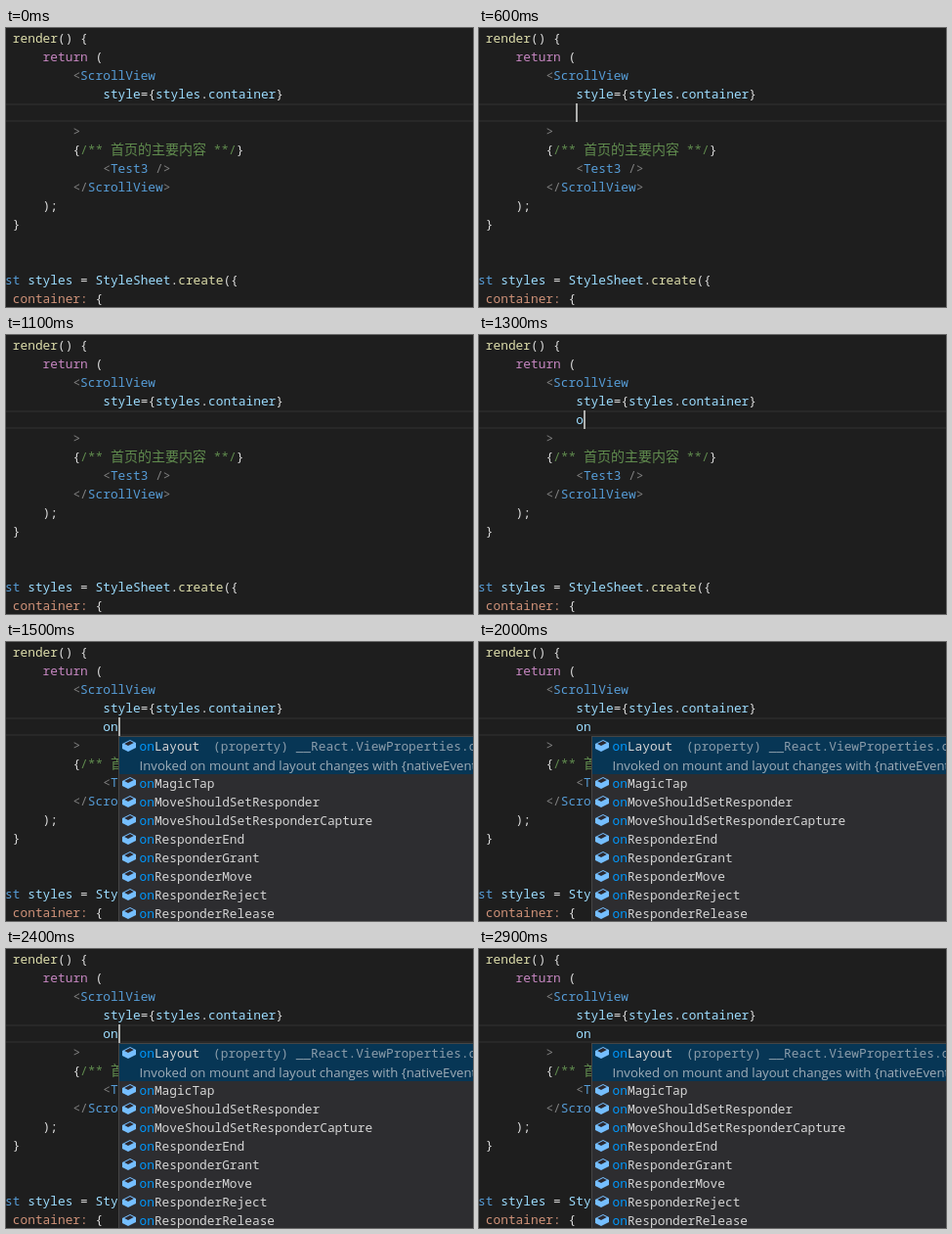
Animation, 478 px wide and 285 px high, one loop 3200 ms. Source, as an HTML page with a canvas:

```html
<!DOCTYPE html>
<html lang="en">
<head>
<meta charset="utf-8">
<title>Editor autocomplete</title>
<style>
  html, body { margin: 0; width: 100%; height: 100%; overflow: hidden; background: #1e1e1e; }
  canvas { display: block; }
</style>
</head>
<body>
<canvas id="stage" width="478" height="285"></canvas>
<script>
const ctx = document.getElementById('stage').getContext('2d', { alpha: false });
const LOOP = 3200, CHAR = 7.7, LINE = 19, LEFT = -24, CARET_ROW = 4;
const MONO = '12.83px "Noto Sans Mono", "Noto Sans CJK SC", monospace';
const MEDIUM = '500 ' + MONO;
const CJK = '14px "Noto Sans CJK SC", "Noto Sans CJK", sans-serif';
const SANS = '13.2px "Open Sans", sans-serif';

const plain = '#dcdcdc', gray = '#808080', blue = '#569cd6', sky = '#9cdcfe',
      sand = '#dcdcaa', pink = '#c586c0', green = '#608b4e', orange = '#ce9178';

// [row, column, text, colour, text, colour, ...]
const code = [
  [0, 4, 'render', sand, '() {', plain],
  [1, 8, 'return', pink, ' (', plain],
  [2, 12, '<', gray, 'ScrollView', blue],
  [3, 16, 'style', sky, '={', plain, 'styles', sky, '.', plain, 'container', sky, '}', plain],
  [5, 12, '>', gray],
  [6, 12, '{', plain, '/** ', green, '首页的主要内容', green, ' **/', green, '}', plain],
  [7, 16, '<', gray, 'Test3', blue, ' />', gray],
  [8, 12, '</', gray, 'ScrollView', blue, '>', gray],
  [9, 8, ');', plain],
  [10, 4, '}', plain],
  [13, 0, 'const ', blue, 'styles', sky, ' = ', plain, 'StyleSheet', sky, '.', plain,
    'create', sand, '({', plain],
  [14, 4, 'container:', orange, ' {', plain],
];

const items = ['onLayout', 'onMagicTap', 'onMoveShouldSetResponder',
  'onMoveShouldSetResponderCapture', 'onResponderEnd', 'onResponderGrant',
  'onResponderMove', 'onResponderReject', 'onResponderRelease'];

const rowTop = row => 1 + LINE * row;

function rect(x, y, w, h, color) {
  ctx.fillStyle = color;
  ctx.fillRect(x, y, w, h);
}

function text(str, x, y, color, font = MONO) {
  ctx.font = font;
  ctx.fillStyle = color;
  ctx.fillText(str, x, y);
}

function drawLine([row, col, ...parts]) {
  let x = LEFT + col * CHAR;
  for (let i = 0; i < parts.length; i += 2) {
    const wide = parts[i].charCodeAt(0) > 0x2e80;
    text(parts[i], x, rowTop(row) + 14, parts[i + 1], wide ? CJK : MEDIUM);
    x += parts[i].length * (wide ? 14 : CHAR);
  }
}

const boxShape = new Path2D('M9 1L1 5v5l6 3 8-4V4z');
const lidShape = new Path2D('M9 2.1L12.8 4 7 6.9 3.2 5z');

function drawIcon(x, y) {
  ctx.save();
  ctx.translate(x, y);
  ctx.fillStyle = '#75beff';
  ctx.fill(boxShape);
  ctx.fillStyle = '#2b282e';
  ctx.fill(lidShape);
  ctx.restore();
}

function drawPopup(x, typed) {
  const top = rowTop(CARET_ROW + 1), labelX = x + 21.5;
  rect(x, top, 478 - x, 285 - top, '#454545');
  rect(x + 1, top + 1, 478 - x, 285 - top, '#2d2d30');
  rect(x + 1, top + 1, 478 - x, 2 * LINE, '#073655');
  items.forEach((label, i) => {
    const y = top + 1 + LINE * (i ? i + 1 : 0);
    drawIcon(x + 3, y + 2);
    text(typed, labelX, y + 14, '#0097fb', MEDIUM);
    text(label.slice(typed.length), labelX + typed.length * CHAR, y + 14, '#d4d4d4');
  });
  text('(property) __React.ViewProperties.onLayout', labelX + 75.5, top + 15, '#8b9dab');
  text('Invoked on mount and layout changes with {nativeEvent: { layout', labelX, top + 35, '#9fadb8', SANS);
}

function draw(t) {
  const typed = t < 1300 ? '' : t < 1500 ? 'o' : 'on';
  const caretX = 99 + 8 * typed.length;
  const caretOn = (t >= 600 && t < 1100) || (t >= 1300 && t < 2000) || (t >= 2400 && t < 2900);
  const y = rowTop(CARET_ROW);

  rect(0, 0, 478, 285, '#1e1e1e');
  rect(0, y, 478, LINE, '#282828');
  rect(0, y + 2, 478, LINE - 4, '#1e1e1e');
  code.forEach(drawLine);
  drawLine([CARET_ROW, 16, typed, sky]);
  if (t >= 1400) drawPopup(caretX, typed);
  if (caretOn) rect(caretX, y, 2, LINE, '#aeafad');
}

function tick() {
  draw(performance.now() % LOOP);
  requestAnimationFrame(tick);
}
tick();
</script>
</body>
</html>
```
